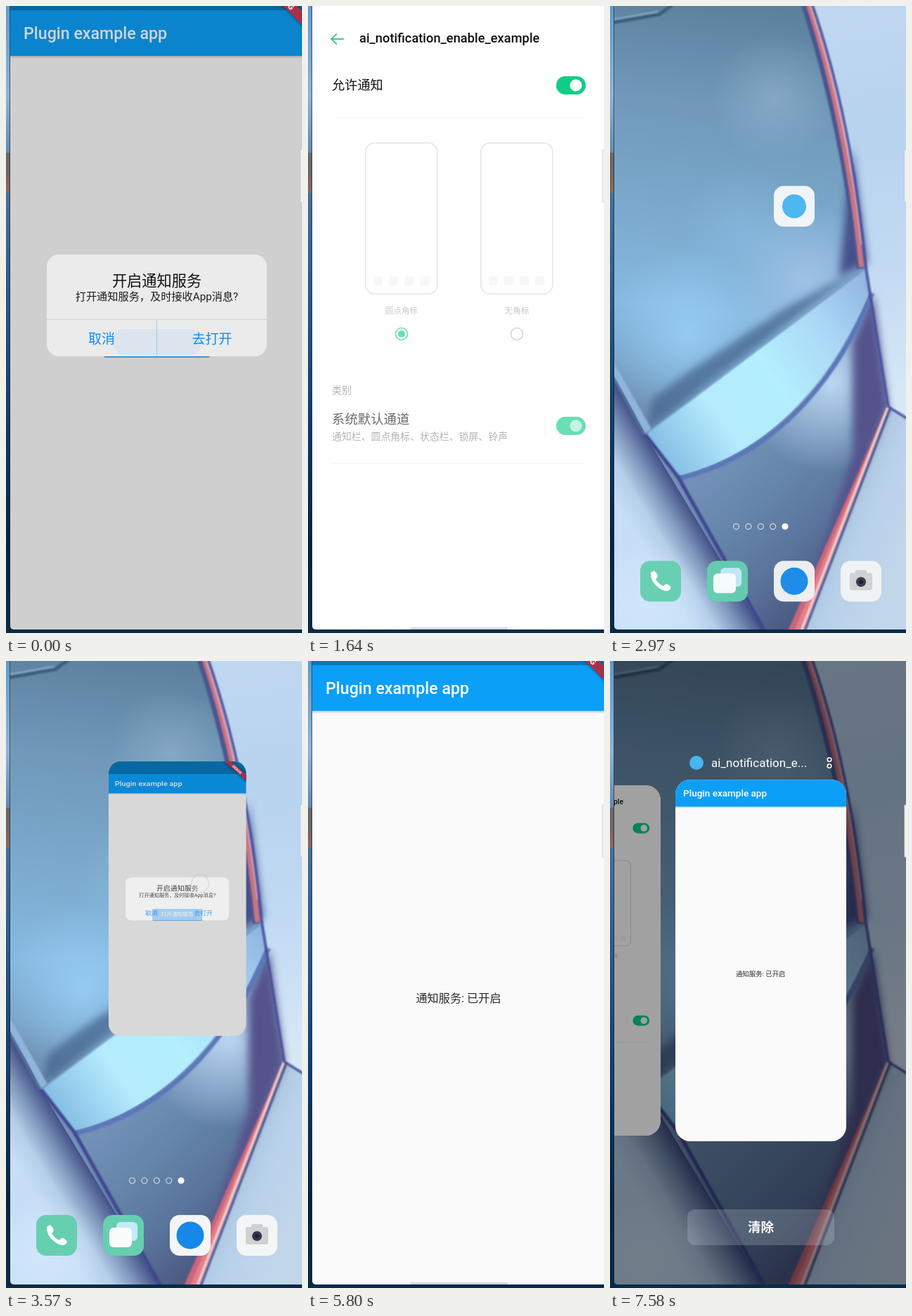
An HTML page with a canvas that plays this animation: 421x893 px, repeating every 8000 ms.

```html
<!DOCTYPE html>
<html lang="zh-CN">
<head>
<meta charset="utf-8">
<title>Notification permission demo</title>
<style>
html, body { margin: 0; width: 100%; height: 100%; overflow: hidden; }
canvas { display: block; width: 421px; height: 893px; }
</style>
</head>
<body>
<canvas id="stage"></canvas>
<script>
const W = 421, H = 893, LOOP = 8000, STEP = 148.63, LAST_STEP = 51;
const SCREEN = { x: 6, w: 417, bottom: 888 };
const stage = document.getElementById('stage');
const ratio = window.devicePixelRatio || 1;
let ctx;

function newLayer(canvas) {
  canvas.width = W * ratio;
  canvas.height = H * ratio;
  const c = canvas.getContext('2d');
  c.scale(ratio, ratio);
  return c;
}

// Timing
const clamp = v => Math.max(0, Math.min(1, v));
const span = (t, from, to) => clamp((t - from) / (to - from));
const easeOut = (p, power = 2) => 1 - (1 - p) ** power;
const mix = (a, b, p) => a.map((v, i) => v + (b[i] - v) * p);

// Drawing helpers
function rect(x, y, w, h, fill, r = 0) {
  ctx.beginPath();
  ctx.roundRect(x, y, w, h, r);
  ctx.fillStyle = fill;
  ctx.fill();
}
function frame(x, y, w, h, color, width, r) {
  ctx.beginPath();
  ctx.roundRect(x, y, w, h, r);
  ctx.strokeStyle = color;
  ctx.lineWidth = width;
  ctx.stroke();
}
function disc(x, y, r, fill, stroke, width = 1) {
  ctx.beginPath();
  ctx.arc(x, y, r, 0, 7);
  if (fill) { ctx.fillStyle = fill; ctx.fill(); }
  if (stroke) { ctx.strokeStyle = stroke; ctx.lineWidth = width; ctx.stroke(); }
}
function path(d, ...fills) {
  for (const fill of fills) {
    ctx.fillStyle = fill;
    ctx.fill(new Path2D(d));
  }
}
function line(d, color, width) {
  ctx.strokeStyle = color;
  ctx.lineWidth = width;
  ctx.stroke(new Path2D(d));
}
function gradient(x0, y0, x1, y1, ...colors) {
  const g = ctx.createLinearGradient(x0, y0, x1, y1);
  colors.forEach((c, i) => g.addColorStop(i / (colors.length - 1), c));
  return g;
}
function glow(x, y, r, rgb, alpha) {
  const g = ctx.createRadialGradient(x, y, 0, x, y, r);
  g.addColorStop(0, `rgba(${rgb},${alpha})`);
  g.addColorStop(1, `rgba(${rgb},0)`);
  return g;
}
function text(s, x, y, size, color, align = 'left', weight = 400) {
  ctx.font = `${weight} ${size}px Roboto, "Noto Sans CJK SC", "Noto Sans CJK", sans-serif`;
  ctx.textAlign = align;
  ctx.textBaseline = 'middle';
  ctx.fillStyle = color;
  ctx.fillText(s, x, y);
}
function faded(alpha, draw) {
  if (alpha <= 0) return;
  ctx.save();
  ctx.globalAlpha *= alpha;
  draw();
  ctx.restore();
}
function touch(x, y, alpha = 1) {
  faded(alpha, () => disc(x, y, 12.5, 'rgba(235,235,240,.6)', 'rgba(160,165,175,.55)', 1.2));
}

// Desktop edge behind the phone window
function desktop() {
  rect(0, 0, W, H, gradient(0, 0, 0, H, '#5f9ccb', '#8fb4d6', '#4a7399', '#315f8c', '#1d4a78', '#0c365f', '#052441', '#0a2b47'));
  rect(0, 209, 6, 57, gradient(0, 209, 0, 266, '#6d6769', '#6f6766', '#8a6a5c'));
  rect(5, 0, 1, H, 'rgba(10,25,45,.6)');
}

function paintWallpaper() {
  const back = 'M0 0H280Q335 160 366 372L50 610L0 510Z';
  const right = 'M280 0H430V592L396 571L366 372Q338 160 280 0Z';
  const left = 'M0 510L50 610L220 890H0Z';
  const lens = 'M50 610L366 372L371 405C330 500 250 632 97 669Z';
  const lower = 'M50 610L97 669C250 632 330 500 371 405L396 571L270 890H218Z';
  rect(0, 0, W, H, '#b9d2ec');
  path(back,
    gradient(190, 0, 120, 580, '#5c819f', '#7098b8', '#7aa8cb', '#86b8de', '#6f93b4'),
    glow(110, 465, 120, '150,205,246', .9),
    glow(280, 390, 110, '170,200,234', .7),
    glow(235, 130, 90, '165,195,222', .4),
    glow(190, 320, 90, '145,195,235', .4));
  path(right, gradient(300, 0, 420, 560, '#c0d7f1', '#b8d3ef', '#c2daf3', '#d8e8f7'));
  path(left,
    gradient(62, 794, 135, 750, '#c6def6', '#b5cee9', '#7d96bb', '#424f86'),
    glow(50, 850, 90, '214,234,252', .7));
  path('M396 571L430 592V890H270Z', gradient(300, 720, 421, 770, '#a3bad7', '#b8d1ea', '#c2d6ea'));
  path(lower,
    gradient(150, 650, 320, 830, '#7391b8', '#6585aa', '#5a749b', '#4b5680'),
    glow(315, 535, 130, '190,218,246', .95));

  // Soft shadows and light along the edges
  ctx.filter = 'blur(6px)';
  path('M52 604L366 368L250 430L120 515L60 560Z', 'rgba(70,100,140,.75)');
  path('M366 366L344 200L338 260L326 385Z', '#46508c');
  path('M374 410L396 571L270 880L345 640L345 480Z', '#55528c');
  ctx.filter = 'blur(1px)';
  line('M0 24L70 12L92 -4', '#3d5c7d', 5);
  line('M0 20L68 8', '#8fb2cf', 2);
  line('M0 508L55 606', '#8fb6da', 10);
  line('M-4 514L48 610', '#5a7da6', 2);
  path(lens, gradient(55, 610, 370, 390, '#86bfe5', '#b4ebfd', '#b3effe', '#acd8f6', '#8fb5e0'));
  line('M50 610L366 372', '#6f93bd', 2);
  line('M97 673C254 636 334 504 373 409', '#5a78b8', 7);
  line('M50 610L97 671L220 890', '#3f4690', 5);
  line('M276 -4Q330 160 356 374', '#4a5590', 10);
  line('M282 -4Q336 160 358 372', '#c87586', 8);
  line('M284 -4Q338 160 358 340', '#eab9c2', 2);
  line('M287 -4Q344 160 364 374L396 571L430 592', '#4a529c', 3.5);
  path('M394 572L253 890H274Z', '#c9687c');
  path('M394 572L262 890H274Z', '#e27f8a');
  line('M395 572L272 890', '#fbd0cf', 3.5);
  line('M399 572L277 890', '#4d4f86', 3);
  ctx.filter = 'none';
}

// Settings screen
function toggle(x, y, on) {
  rect(x, y - 13, 42, 26, on ? '#0fce86' : '#e8e8e8', 13);
  if (on) disc(x + 28, y, 8.5, '#fff');
  else disc(x + 13, y, 6, null, '#fff', 3.6);
}
function phonePreview(x, label, chosen) {
  frame(x, 195, 102, 215, '#dfdfdf', 2, 13);
  for (let i = 0; i < 4; i++) rect(x + 11 + i * 22, 385, 13, 13, '#f4f4f4', 3);
  text(label, x + 51, 435, 11.6, '#aaa', 'center');
  disc(x + 51, 467, 8.5, null, chosen ? '#0fce86' : '#bbb', 1.6);
  if (chosen) disc(x + 51, 467, 5, '#0fce86');
}
function settings(on, details) {
  rect(6, -37, 417, 925, '#fefefe');
  line('M51 47H33M41 39.5L33 47L41 54.5', '#3cc99b', 1.8);
  text('ai_notification_enable_example', 73, 47, 18.3, '#111', 'left', 500);
  text('允许通知', 34, 114, 18.2, '#111');
  toggle(353, 113, on);
  faded(1 - details, () => rect(34, 159, 360, 1, '#e9e9e9'));
  faded(details, () => {
    phonePreview(82, '圆点角标', true);
    phonePreview(246, '无角标', false);
    text('类别', 34, 548, 14, '#888');
    text('系统默认通道', 34, 590, 18.4, '#111');
    text('通知栏、圆点角标、状态栏、锁屏、铃声', 34, 614, 13.9, '#888');
    rect(337, 585, 1, 27, '#ebebeb');
    toggle(353, 598, true);
    rect(34, 651, 360, 1, '#f3f3f3');
  });
}

function banner() {
  ctx.save();
  ctx.translate(395, -9);
  ctx.rotate(Math.PI / 4);
  ctx.shadowColor = 'rgba(0,0,0,.5)';
  ctx.shadowBlur = 5;
  rect(-60, -7, 120, 14, '#a5324a');
  ctx.shadowBlur = 0;
  text('DEBUG', 0, .5, 11.4, '#f0e4e8', 'center', 900);
  ctx.restore();
}

// The prompt is frosted glass at rest and plain translucent white while it fades
function prompt(opacity) {
  rect(6, -37, 417, 925, 'rgba(0,0,0,.172)');
  rect(58, 354, 313, 145, 'rgba(255,255,255,.75)', 18);
  faded(span(opacity, .85, 1), () => {
    rect(58, 354, 313, 145, '#ebebeb', 18);
    rect(152, 460, 126, 37, '#dce5ed', 16);
    rect(58, 446, 313, 1, '#cfd2d4');
    rect(214, 447, 1, 52, '#a9c8e0');
  });
  text('开启通知服务', 214.5, 393, 21.2, '#111', 'center', 500);
  text('打开通知服务，及时接收App消息?', 214.5, 415, 15.2, '#1c1c1c', 'center');
  text('取消', 136, 475, 19, '#0c8af5', 'center');
  text('去打开', 293, 475, 19, '#0c8af5', 'center');
}

// Plugin example screen
function app({ dialog = 0, granted = true, ribbon = 1 } = {}) {
  rect(6, -37, 417, 925, '#fafafa');
  rect(6, 71, 417, 4, gradient(0, 71, 0, 75, '#c4c9cc', '#fafafa'));
  rect(6, -37, 417, 43, '#0879bd');
  rect(6, 6, 417, 65, '#0c9ff8');
  text('Plugin example app', 25, 40, 23.2, '#fff', 'left', 500);
  if (granted) {
    text('通知服务: 已开启', 214, 481, 16.2, '#2c2c2c', 'center');
  } else {
    rect(139, 460, 151, 40.5, '#2196f3', 2);
    text('打开通知服务', 214.5, 480, 16.2, '#fff', 'center');
  }
  faded(dialog, () => prompt(dialog));
  faded(ribbon, banner);
}

function homeBar() {
  rect(145, 885, 139, 3, '#d6d8da', 1.5);
}

// Draws a screen into a card: x, y, width, height, first visible screen row
function card([x, y, w, h, top], radius, draw) {
  ctx.save();
  ctx.beginPath();
  ctx.roundRect(x, y, w, h, radius);
  ctx.clip();
  ctx.translate(x, y);
  ctx.scale(w / SCREEN.w, h / (SCREEN.bottom - top));
  ctx.translate(-SCREEN.x, -top);
  draw();
  ctx.restore();
}
const FULL = [6, -37, 417, 925, -37];
const ICON = [233, 255, 58, 58, -37];
const DRAGGED = [184, -65, 206, 435, -37];
const FLUNG = [225, -440, 180, 380, -37];
const LIFTED = [72, 53, 308, 668, -17];
const RECENT = [93, 169, 243, 515, 5];
const SIDE_OUT = [-330, 30, 330, 699, 5];
const SIDE_LIFTED = [-260, 83, 294, 622, 5];
const SIDE_RECENT = [-164, 177, 236, 499, 5];

function dock() {
  for (let i = 0; i < 4; i++) disc(179.5 + i * 17.4, 740, 4, null, 'rgba(255,255,255,.75)', 1.2);
  disc(249, 740, 4.6, '#fff');
  ['#66cfb0', '#66cfb0', '#f3f5f6', '#f3f5f6'].forEach((c, i) => rect(43 + i * 95, 789, 58, 58, c, 14));
  path('M58 806Q63 800 67 808Q69 812 65 815Q69 822 76 825Q79 820 83 823Q90 827 84 831Q78 834 69 827Q57 818 58 806Z', '#fff');
  rect(157, 799, 30, 27, '#c5eafa', 6);
  rect(147, 807, 32, 28, '#fafcfc', 6);
  disc(262, 818, 19.5, '#1588ea');
  rect(341, 806, 32, 25, '#cfd1d2', 3);
  rect(349, 802, 16, 6, '#cfd1d2', 2);
  disc(357, 819, 7, '#34364f');
  disc(357, 819, 3, '#1d1e30');
}

// Scenes
function permissionScene(t) {
  app({ dialog: 1, granted: false });
  if (t > 140 && t < 440) touch(298, 478, t < 200 ? 1 : .5);
  const slide = span(t, 150, 690);
  if (!slide) return;
  rect(6, 0, 417, 888, `rgba(5,15,30,${.8 * slide})`);
  ctx.save();
  ctx.translate(SCREEN.w * (1 - slide) ** 3, 0);
  settings(t > 1420, span(t, 1400, 1780));
  ctx.restore();
  homeBar();
  if (t > 1300 && t < 1600) touch(394, 113, t < 1450 ? 1 : .6);
}

function homeScene(t) {
  ctx.drawImage(wallpaper, 0, 0, W, H);
  const arrive = easeOut(span(t, 2560, 3080));
  faded(arrive, () => {
    ctx.save();
    ctx.translate(0, 30 * (1 - arrive));
    dock();
    if (t < 3450) {
      rect(233, 255, 58, 58, '#f6f8fa', 14);
      disc(262, 284, 17, '#47b5f0');
    }
    ctx.restore();
  });
  if (t < 2760) {
    const drag = easeOut(span(t, 2040, 2378));
    const pose = t < 2400 ? mix(FULL, DRAGGED, drag) : mix(DRAGGED, FLUNG, span(t, 2378, 2760));
    card(pose, 21 * drag, () => settings(true, 1));
    if (t < 2450) touch(...mix([275, 880], [343, 694], drag));
  }
  if (t > 3450) {
    const open = easeOut(span(t, 3450, 3994));
    const dialog = 1 - span(t, 3510, 3800);
    card(mix(ICON, FULL, open), 28 * (1 - open), () => app({ dialog, granted: t > 3800 }));
  }
  if (t > 3200 && t < 3700) touch(276, 317, t < 3500 ? 1 : .6);
}

function recentsScene(t) {
  const lift = easeOut(span(t, 6190, 6540), 1.6);
  const settle = easeOut(span(t, 6600, 7250), 3);
  const between = (a, b, c) => settle ? mix(b, c, settle) : mix(a, b, lift);
  ctx.drawImage(wallpaper, 0, 0, W, H);
  rect(6, 0, 417, 888, `rgba(0,2,4,${.42 * lift + .04 * settle})`);
  card(between(SIDE_OUT, SIDE_LIFTED, SIDE_RECENT), 24 - 3 * settle, () => {
    settings(true, 1);
    rect(6, -37, 417, 925, 'rgba(0,0,0,.37)');
  });
  card(between(FULL, LIFTED, RECENT), 24 * lift - 3 * settle, () => app({ ribbon: 1 - settle }));
  if (t < 6800) touch(...mix([328, 880], [328, 750], lift));
  faded(span(t, 6820, 7280), () => {
    disc(123, 145, 10, '#47b5f0');
    text('ai_notification_e...', 144, 146, 17, '#fff');
    disc(312, 140.5, 2.8, null, '#fff', 1.6);
    disc(312, 149.5, 2.8, null, '#fff', 1.6);
    rect(110, 781, 209, 51, 'rgba(225,235,245,.2)', 11);
    text('清除', 214.5, 808, 18.5, '#fff', 'center', 700);
  });
}

function render(t) {
  desktop();
  ctx.save();
  ctx.beginPath();
  ctx.roundRect(6, -20, 430, 908, 5);
  ctx.clip();
  if (t < 2050) {
    permissionScene(t);
  } else if (t < 4200) {
    homeScene(t);
  } else if (t < 6200) {
    app();
    homeBar();
  } else {
    recentsScene(t);
  }
  ctx.restore();
  rect(418, 204, 6, 76, 'rgba(190,195,200,.5)', 1.5);
  rect(419, 205, 6, 74, '#eceeef', 1);
}

const wallpaper = document.createElement('canvas');
ctx = newLayer(wallpaper);
paintWallpaper();
ctx = newLayer(stage);

const start = performance.now();
function tick() {
  const now = (performance.now() - start) % LOOP;
  render(Math.min(LAST_STEP, Math.floor((now + 6) / STEP)) * STEP);
  requestAnimationFrame(tick);
}
tick();
</script>
</body>
</html>
```
